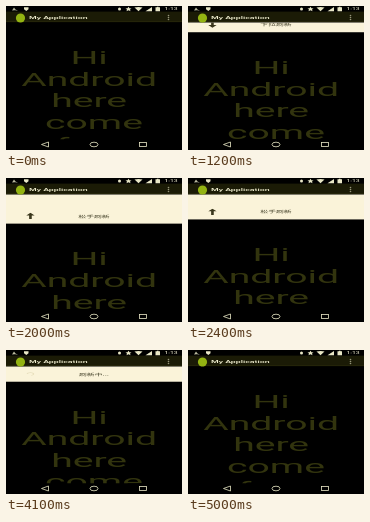
An HTML page that plays this animation: 176x144 px, repeating every 5100 ms.

```html
<!DOCTYPE html>
<html lang="zh-CN">
<head>
<meta charset="utf-8">
<title>Pull to refresh</title>
<style>
  html, body { margin: 0; width: 100%; height: 100%; overflow: hidden; background: #000; }
  /* A 360 x 640 dp phone screen, squeezed into the stage. */
  #phone {
    position: absolute; left: 0; top: 0; width: 360px; height: 640px;
    transform: scale(calc(176 / 360), calc(144 / 640)); transform-origin: 0 0;
    font-family: Roboto, "Noto Sans", sans-serif; color: #f2f0d2;
  }
  #phone div { position: absolute; }
  #clock { right: 9px; top: 0; font-size: 14px; line-height: 27px; }
  #bar { left: 0; top: 25px; width: 360px; height: 48px; background: #1b1b06; box-shadow: inset 0 -4px #2e2e0c; }
  #title { left: 47px; top: 2px; font-size: 18px; font-weight: 500; line-height: 48px; white-space: pre; }
  #content { left: 0; top: 73px; width: 360px; height: 519px; overflow: hidden; background: #000; }
  #list { left: 0; top: 0; width: 360px; height: 519px; }
  #sheet { left: 0; bottom: 100%; width: 360px; height: 200px; background: #faf3d9; }
  #label {
    left: 0; bottom: 0; width: 360px; height: 68px; line-height: 68px; text-align: center;
    font-size: 16px; font-family: "Noto Sans CJK SC", "Noto Sans CJK", sans-serif; color: #3c3a22;
  }
  #sheet svg { position: absolute; left: 35px; bottom: 19px; width: 30px; height: 30px; }
  #words {
    left: 0; top: 111px; width: 360px; text-align: center; white-space: pre;
    font-size: 80px; line-height: 96px; color: #32340e;
  }
  #icons { position: absolute; left: 0; top: 0; width: 176px; height: 144px; }
</style>
</head>
<body>
<div id="phone">
  <div id="clock">1:13</div>
  <div id="bar"><div id="title">My Application</div></div>
  <div id="content">
    <div id="list">
      <div id="sheet">
        <div id="label"></div>
        <svg id="arrow" viewBox="-14 -14 28 28">
          <path d="M-2.5-13h5V2H8L0 13-8 2h5.500z" fill="#3a371c"/>
        </svg>
        <svg id="spinner" viewBox="-14 -14 28 28">
          <circle r="6" fill="none" stroke="#e8e0be" stroke-width="2.500" stroke-dasharray="26 12"/>
        </svg>
      </div>
      <div id="words"></div>
    </div>
  </div>
</div>
<svg id="icons" viewBox="0 0 176 144" fill="#e9e7c6">
  <path d="M6 4.500 8 1.500 9.500 3.500 12 4.800 9 4.200z" opacity=".8"/>
  <path d="M18 1.300H22.500V3.200L20.300 5 18 3.200z"/>
  <circle cx="113.500" cy="3" r="1.500"/>
  <path d="M122.500 .8 123.500 2.300 125.500 2.500 124 3.600 124.500 5.200 122.500 4.300 120.500 5.200 121 3.600 119.500 2.500 121.500 2.300z"/>
  <path d="M128.500 1.500Q132.500 .3 136.500 1.500L132.500 5.200z"/>
  <path d="M139.500 5.200 146 1V5.200z"/>
  <path d="M149.500 1.300H151V.8H152.500V1.300H154V5.200H149.500z"/>
  <circle cx="14.500" cy="12" r="4.600" fill="#93b312"/>
  <g opacity=".6"><circle cx="162.500" cy="9.500" r=".8"/><circle cx="162.500" cy="11.500" r=".8"/><circle cx="162.500" cy="13.500" r=".8"/></g>
  <g fill="none" stroke="#e9e7c6" stroke-width=".8">
    <path d="M35.500 138.500 42.500 136V141z"/>
    <ellipse cx="88" cy="138.500" rx="4" ry="2.300"/>
    <rect x="133.500" y="136.500" width="7" height="4"/>
  </g>
</svg>
<script>
  const LOOP = 5100, STEP = 100, DP = 640 / 144;
  const $ = id => document.getElementById(id);

  // [time in ms, value]
  const PULL = [[800, 0], [900, 1], [1200, 9.8], [1600, 28], [1700, 29], [2000, 29.2],
                [2100, 28.6], [2400, 25], [2500, 21], [2600, 15.3], [4400, 15.3], [4500, 13],
                [4700, 7], [4900, 1], [5000, 0]];
  const TURN = [[1400, 0], [1600, 72], [1800, 180]];
  const RELEASE = 1400, REFRESH = 2600, DONE = 4500;

  $('words').textContent = 'Hi \nAndroid \nhere \ncome\nfans';

  function at(track, t) {
    const i = track.findIndex(k => k[0] > t);
    if (i === 0) return track[0][1];
    if (i < 0) return track[track.length - 1][1];
    const [t0, a] = track[i - 1], [t1, b] = track[i];
    return a + (b - a) * (t - t0) / (t1 - t0);
  }

  function draw(now) {
    const t = Math.floor(now % LOOP / STEP) * STEP;
    const busy = t >= REFRESH;
    $('list').style.transform = `translateY(${at(PULL, t) * DP}px)`;
    $('label').textContent = busy ? '刷新中...' : t >= RELEASE ? '松手刷新' : '下拉刷新';
    $('arrow').style.visibility = busy ? 'hidden' : 'visible';
    $('arrow').style.transform = `rotate(${at(TURN, t)}deg)`;
    $('spinner').style.visibility = busy && t < DONE ? 'visible' : 'hidden';
    $('spinner').style.transform = `rotate(${(t - REFRESH) * 0.36}deg)`;
  }

  const start = performance.now();
  function tick() {
    draw(performance.now() - start);
    requestAnimationFrame(tick);
  }
  tick();
</script>
</body>
</html>
```
